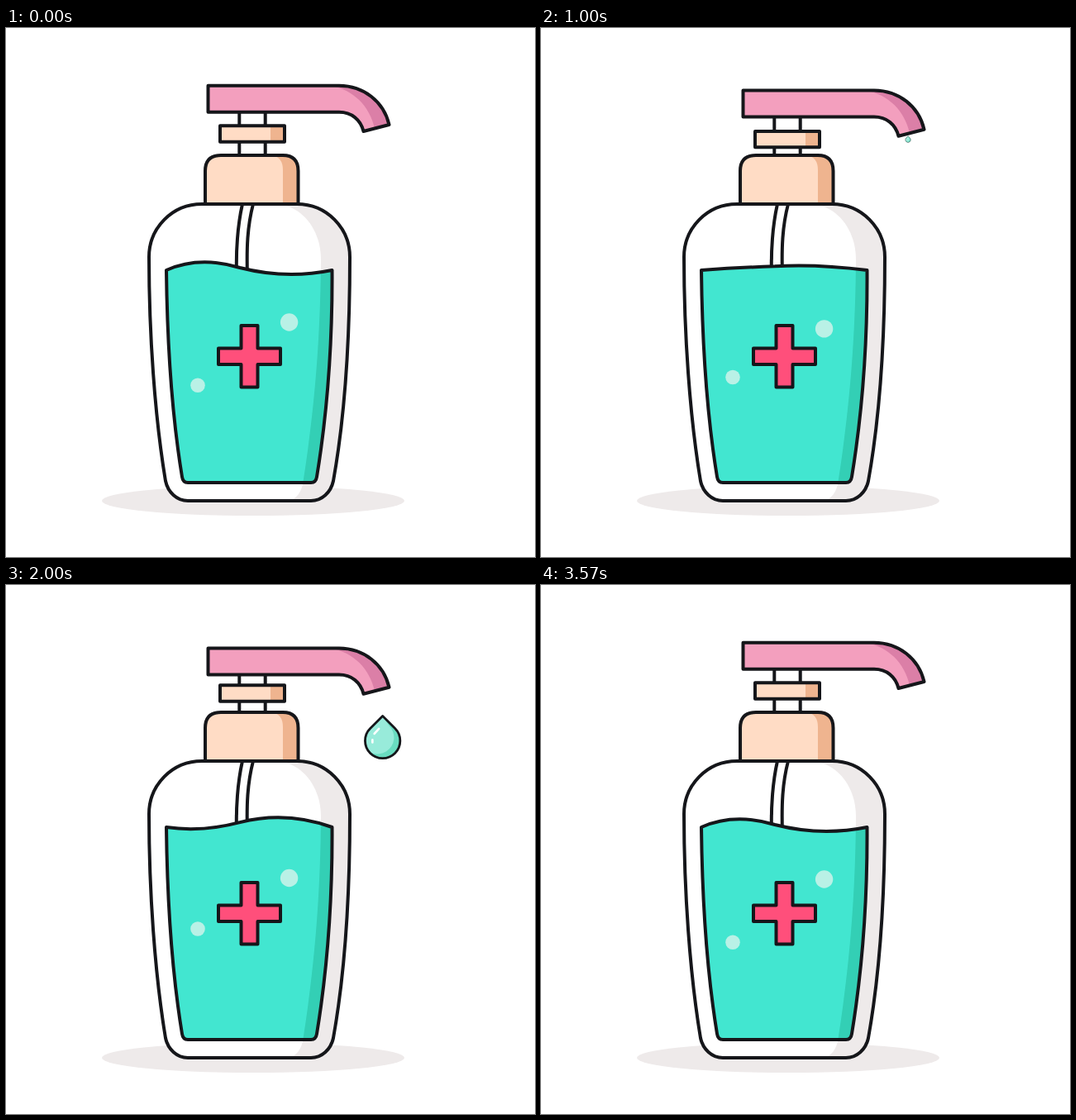
An HTML page for the animation above (3.61 s loop, 640x640 px).

```html
<!DOCTYPE html>
<html lang="en">
<head>
<meta charset="utf-8">
<title>Hand sanitizer</title>
<style>
  html, body { margin: 0; width: 100%; height: 100%; overflow: hidden; background: #fff; }
  svg { display: block; width: 100vw; height: 100vh; }

  .line { stroke: #15161a; stroke-width: 4; stroke-linejoin: round; }
  .none { fill: none; }
  .white { fill: #fff; }
  .grey { fill: #eeeaea; }
  .peach { fill: #ffdcc5; }
  .tan { fill: #efb48f; }
  .pink { fill: #f39fbe; }
  .rose { fill: #db7fa7; }
  .aqua { fill: #42e6d0; }
  .teal { fill: #33cfb5; }
  .bubble { fill: #b9f1e6; }

  .anim {
    animation: 3610ms cubic-bezier(.333, 0, .667, 1) infinite;
  }
  .wave { animation-name: wave; }
  .head { animation-name: head; }
  .ring { animation-name: ring; }
  .rise { animation-name: rise; }
  .bob { animation-name: bob; }
  .fall { animation-name: fall; }
  .grow { animation-name: grow; }

  @keyframes wave {
    0%, 100% { d: path("M194 293 C221 281 250 280 283 290 C318 299 355 301 394.5 293 C395 380 388 470 376 543 Q375 550 369 550 H220 Q214 550 213 543 C201 470 195 380 194 293 Z"); }
    50% { d: path("M194 293 C224 298 251 296 283 287 C320 277 358 279 394.5 293 C395 380 388 470 376 543 Q375 550 369 550 H220 Q214 550 213 543 C201 470 195 380 194 293 Z"); }
  }
  @keyframes head {
    0%, 60.94%, 100% { translate: 0 0; }
    17.73%, 45.98% { translate: 0 22px; }
    30.47% { translate: 0 3.5px; }
  }
  @keyframes ring {
    0%, 60.94%, 100% { translate: 0 0; }
    17.73% { translate: 0 8.4px; }
    30.47% { translate: 0 6.4px; }
    45.98% { translate: 0 9.7px; }
  }
  @keyframes rise {
    0%, 100% { translate: 0 0; }
    50% { translate: 0 -16.8px; }
  }
  @keyframes bob {
    0%, 100% { translate: 0 0; }
    25% { translate: 0 8px; }
    75% { translate: 0 -6.4px; }
  }
  @keyframes fall {
    0%, 19.25% { translate: 443px 127px; animation-timing-function: linear; }
    35.18% { translate: 445px 134px; animation-timing-function: linear; }
    46.26% { translate: 451px 143.5px; animation-timing-function: cubic-bezier(.333, .13, .667, .33); }
    65.65% { translate: 468px 198px; animation-timing-function: cubic-bezier(.333, .2, .667, .46); }
    76.73% { translate: 479px 302px; animation-timing-function: linear; }
    85.3%, 100% { translate: 485px 425px; }
  }
  @keyframes grow {
    0%, 19.25%, 85.3%, 100% { scale: 0; }
    53.88%, 66.48% { scale: 1; }
  }
</style>
</head>
<body>
<svg viewBox="0 0 640 640">
  <defs>
    <clipPath id="liquid"><path class="wave anim"/></clipPath>
    <clipPath id="drop"><path d="M0 0 L15 15 A21.2 21.2 0 1 1 -15 15 Z"/></clipPath>
  </defs>

  <ellipse class="grey" cx="299" cy="572" rx="183" ry="18"/>

  <!-- bottle -->
  <path class="white" d="M237 213 C201 213 173 242 173 277 C173 370 180 470 193 548 C196 562 207 572 220 572 H369 C382 572 393 562 396 548 C410 470 416 370 416 277 C416 242 388 213 352 213 Z"/>
  <path class="grey" d="M330 213 C360 217 381 245 381 280 C381 380 372 470 360 548 C357 562 352 570 341 572 H369 C382 572 393 562 396 548 C410 470 416 370 416 277 C416 242 388 213 352 213 Z"/>
  <path class="line none" d="M286 213 C280 240 278 265 279 300 M299 213 C292 240 291 265 292 300"/>
  <path class="line none" d="M237 213 C201 213 173 242 173 277 C173 370 180 470 193 548 C196 562 207 572 220 572 H369 C382 572 393 562 396 548 C410 470 416 370 416 277 C416 242 388 213 352 213 Z"/>

  <!-- liquid -->
  <path class="aqua wave anim"/>
  <g clip-path="url(#liquid)">
    <path class="teal" d="M381 270 C381 380 372 470 359 552 H420 V270 Z"/>
  </g>
  <path class="line none wave anim"/>
  <circle class="bubble bob anim" cx="342.6" cy="356" r="10.7"/>
  <circle class="bubble rise anim" cx="232" cy="432.2" r="8.8"/>
  <path class="line" fill="#ff4f7b" d="M284.5 360 H304.5 V387.5 H332 V407 H304.5 V434.5 H284.5 V407 H257 V387.5 H284.5 Z"/>

  <!-- pump -->
  <path class="line white" d="M282.3 154 V101 M313.7 101 V154"/>
  <path class="peach" d="M241 213 V173 Q241 154 260 154 H335 Q353.5 154 353.5 173 V213 Z"/>
  <path class="tan" d="M320 154 Q335 155 335 172 V213 H353.5 V173 Q353.5 154 335 154 Z"/>
  <path class="line none" d="M241 213 V173 Q241 154 260 154 H335 Q353.5 154 353.5 173 V213 Z"/>

  <g class="ring anim">
    <rect class="peach" x="259" y="118.3" width="78" height="19.4"/>
    <rect class="tan" x="320" y="118.3" width="17" height="19.4"/>
    <rect class="line none" x="259" y="118.3" width="78" height="19.4"/>
  </g>

  <g class="fall anim"><g class="grow anim">
    <g clip-path="url(#drop)">
      <rect x="-25" width="50" height="55" fill="#69dcc0"/>
      <path fill="#98ebda" d="M0 0 L8 12 A20 20 0 1 1 -25 33 V0 Z"/>
    </g>
    <path d="M-10 21.5 L-4.5 15.5 M-12.3 29 V32" fill="none" stroke="#fff" stroke-width="2.6" stroke-linecap="round"/>
    <path class="line none" style="stroke-width:2.8" d="M0 0 L15 15 A21.2 21.2 0 1 1 -15 15 Z"/>
  </g></g>

  <g class="head anim">
    <path class="pink" d="M244.5 69.8 H403 C433 70 457 89 463.5 117 L432.5 125 C429 111 418 101.8 403 101.8 H244.5 Z"/>
    <path class="rose" d="M393 69.8 H403 C433 70 457 89 463.5 117 L446 121.5 C440 95 421 75 393 69.8 Z"/>
    <path class="line none" d="M244.5 69.8 H403 C433 70 457 89 463.5 117 L432.5 125 C429 111 418 101.8 403 101.8 H244.5 Z"/>
  </g>
</svg>
</body>
</html>
```
